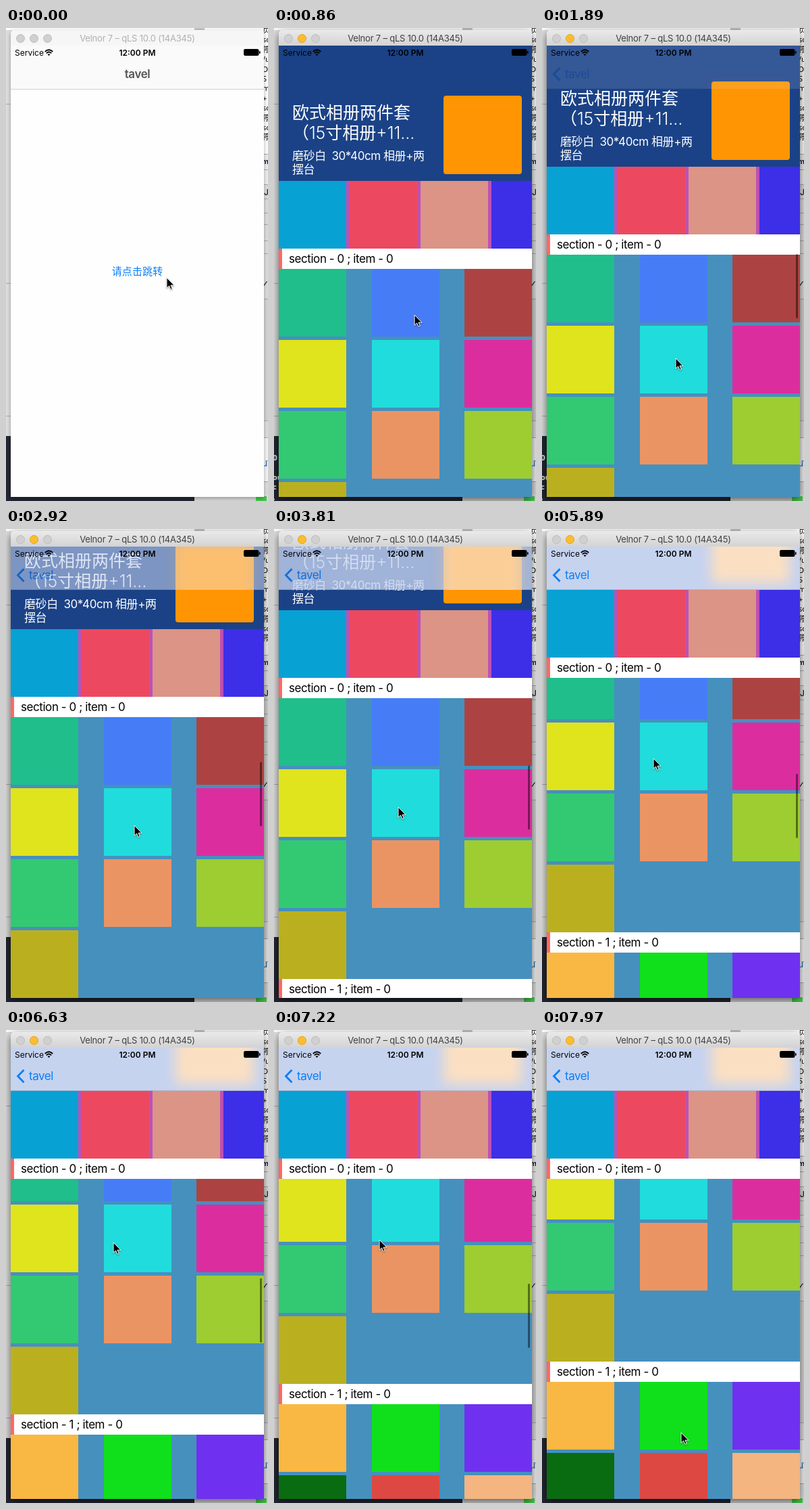
Animation of 388 by 699 pixels, one loop 8 s. Source, as an HTML page:

```html
<!DOCTYPE html>
<html lang="zh">
<head>
<meta charset="utf-8">
<title>Sticky sections</title>
<style>
html, body { margin: 0; width: 100%; height: 100%; overflow: hidden; }
body { position: relative; background: #dedede; font: 17px/20px Inter, "Noto Sans CJK SC", "Noto Sans CJK", sans-serif; letter-spacing: -.43px; }
div, svg { position: absolute; left: 0; top: 0; white-space: pre; }
#stage { width: 388px; height: 699px; overflow: hidden; }
#code { left: 380px; top: -4px; font: 11px/14.4px "Noto Sans", "Noto Sans CJK SC", "Noto Sans CJK", sans-serif; letter-spacing: 0; }
#log { left: -2px; top: 629px; color: #eee; font: bold 10px/14.4px "DejaVu Sans", sans-serif; letter-spacing: 0; }
#window { left: 7px; top: 3px; width: 375px; height: 690px; border-radius: 5px 5px 0 0; box-shadow: 0 2px 6px #0005; }
#window.active { box-shadow: 0 4px 14px #0009; }
#chrome { width: 375px; height: 23px; border-radius: 5px 5px 0 0; background: #f6f6f6; color: #b0b0b0; font-size: 13px; line-height: 25px; letter-spacing: -.2px; text-align: center; }
.active #chrome { background: linear-gradient(#eaeaea, #d3d3d3); color: #404040; }
.light { width: 11px; height: 11px; top: 6px; border-radius: 50%; background: #d0d0d0; border: .5px solid #bcbcbc; }
.active .middle { background: #fdbd2e; border-color: #dfa023; }
#screen { top: 23px; width: 375px; height: 667px; overflow: hidden; background: #fff; }
.page { width: 375px; height: 667px; overflow: hidden; }
#home { background: #fefefe; }
#homeBar { width: 375px; height: 64px; background: #fafafa; border-bottom: 1px solid #d2d2d2; color: #555; font-weight: 600; text-align: center; line-height: 85px; }
#jump { top: 324px; width: 375px; text-align: center; color: #0b7ff7; font-size: 15px; letter-spacing: .1px; }
#list { background: #4690be; }
#cells { width: 375px; }
.tile { width: 100px; height: 100px; }
.section { width: 375px; height: 30px; background: #fff; line-height: 31px; text-indent: 15px; color: #000; }
.section::before { content: ""; position: absolute; left: 0; width: 5px; height: 30px; background: #ff6866; }
#header { width: 375px; height: 200px; background: #1b4286; color: #fff; }
#name { left: 20px; top: 84px; font-size: 25px; line-height: 30px; font-weight: 300; letter-spacing: 0; }
#detail { left: 20px; top: 153px; }
#photo { left: 244px; top: 74px; width: 116px; height: 116px; border-radius: 4px; background: #ff9502; }
#strip { width: 375px; height: 100px; background: #bd51b5; overflow: hidden; }
#bar { width: 375px; height: 64px; overflow: hidden; background: #c6d3ef; color: #0b7ff7; box-shadow: inset 0 -1px #0002; }
#glow { left: 244px; width: 116px; height: 116px; background: #fbdfc2; filter: blur(9px); }
#scroller { left: 369px; width: 3px; height: 95px; border-radius: 2px; background: #0007; }
#status { width: 375px; height: 20px; font-size: 12px; line-height: 21px; letter-spacing: 0; color: #000; }
</style>
</head>
<body>
<div id="stage"></div>
<script>
const $ = id => document.getElementById(id);
const box = (x, y, w, h, color) =>
  `<div style="left:${x}px;top:${y}px;width:${w}px;height:${h}px;background:${color}"></div>`;
const tile = (x, y, color) => `<div class="tile" style="left:${x}px;top:${y}px;background:${color}"></div>`;
const section = (n, y) => `<div class="section" style="top:${y}px">section - ${n} ; item - 0</div>`;
const grid = (colors, top) =>
  colors.map((c, i) => tile(i % 3 * 137.5, top + Math.floor(i / 3) * 105, c)).join('');

const firstColors = ['#20be8b', '#467df7', '#ac4342', '#e0e41c', '#21dcdc', '#dc2d9f', '#33c973', '#eb9463', '#9dcd31', '#bab01f'];
const secondColors = ['#f9b843', '#10e01c', '#6f31ef', '#0a6c10', '#dd4843', '#f4b580'];
const stripColors = ['#08a1d4', '#ec4960', '#db9485', '#3d2ee8'];

const desktop =
  box(0, 0, 279, 3, '#fff') + box(294, 0, 94, 186, '#fff') + box(279, 0, 15, 3, '#c4c4c4') +
  [112, 377, 573].map(y => box(0, y, 7, 1, '#aaa')).join('') +
  box(0, 603, 279, 96, '#232633') + box(279, 693, 109, 6, '#d8d8d8') +
  box(380, 187, 8, 45, '#eee') + box(380, 400, 8, 180, '#d4d4d4') + box(380, 605, 8, 65, '#f4f4f4') +
  [186, 209, 231, 252, 273, 290, 314, 333, 400, 580, 605, 670].map(y => box(380, y, 8, 1, '#aaa')).join('') +
  box(370, 692, 16, 7, '#45c94b') +
  `<div id="code">页\nso\n停\n/u\nD\nS\nm\n+\nso\n停\nso\n停</div>
  <div style="left:379px;top:187px;font-size:11px;font-weight:700;color:#224">m</div>
  <div style="left:382px;top:233px;font-size:12px">J</div>
  <div style="left:379px;top:368px;font:12px/20px 'DejaVu Sans',sans-serif">✓</div>
  <div style="left:378px;top:632px;font-size:16px;color:#2a6fb5">ut</div>
  <div id="log">0\n\nou\nc\n,</div>`;

const statusBar = `<div id="status"><div style="left:6px">Service</div>
  <svg style="left:50px;top:5px" width="13" height="11" fill="none" stroke="#000" stroke-width="1.8">
    <path d="M.8 4Q6.5-1.5 12.2 4M2.8 6.3Q6.5 2.8 10.2 6.3"/><path d="M6.5 10 4.5 8Q6.5 6.4 8.5 8Z" fill="#000" stroke="none"/></svg>
  <div style="width:375px;text-align:center;font-weight:600">12:00 PM</div>
  <svg style="left:345px;top:5px" width="26" height="11">
    <rect x=".5" y=".5" width="21.5" height="9" rx="1.5" stroke="#000"/><rect x="23" y="3" width="1.6" height="4" rx=".8"/></svg></div>`;

$('stage').innerHTML = desktop + `
<div id="window">
  <div id="chrome">Velnor 7 – qLS 10.0 (14A345)<div class="light" style="left:8px"></div><div class="light middle" style="left:28px"></div><div class="light" style="left:48px"></div></div>
  <div id="screen">
    <div id="home" class="page"><div id="homeBar">tavel</div><div id="jump">请点击跳转</div></div>
    <div id="list" class="page">
      <div id="cells">${grid(firstColors, 130)}${section(1, 545)}${grid(secondColors, 575)}</div>
      <div id="header">
        <div id="name">欧式相册两件套\n（15寸相册+11…</div>
        <div id="detail">磨砂白  30*40cm 相册+两\n摆台</div>
        <div id="photo"></div>
      </div>
      <div id="pinned">
        <div id="strip">${stripColors.map((c, i) => tile(i * 105, 0, c)).join('')}</div>
        ${section(0, 100)}
      </div>
      <div id="bar">
        <div id="glow"></div>
        <svg style="left:8px;top:31px" width="14" height="23"><path d="M11.5 2 2.5 11.2 11.5 20.5" fill="none" stroke="#0b7ff7" stroke-width="2.8"/></svg>
        <div style="left:27px;top:32px">tavel</div>
      </div>
      <div id="scroller"></div>
    </div>
    ${statusBar}
  </div>
</div>
<svg id="cursor" width="16" height="22" style="filter:drop-shadow(0 1px 1px #0006)">
  <path transform="translate(1 1)" d="M0 0V15.3L3.6 12 6 17.4 8.3 16.4 6 11.2H11Z" stroke="#fff"/></svg>`;

// Tick, top edge of the scrolling list on the stage
const listTrack = [[11, 226], [12, 217], [13, 205], [20, 148], [26, 120], [32, 84], [34, 79], [40, 51], [45, 23],
  [48, -6], [49, -22], [50, -36], [51, -45], [52, -51], [54, -55]];
// Tick, pointer x, pointer y
const cursorTrack = [[0, 238, 369], [2, 214, 364], [4, 212, 366], [9, 201, 510], [11, 199, 514], [13, 198, 488],
  [20, 190, 438], [26, 184, 411], [34, 172, 370], [45, 159, 314], [48, 152, 284], [49, 156, 310], [53, 206, 585], [54, 206, 595]];

const clamp = v => Math.max(0, Math.min(1, v));
function sample(track, tick) {
  const next = track.findIndex(key => key[0] > tick);
  if (next < 0) return track[track.length - 1].slice(1);
  if (next === 0) return track[0].slice(1);
  const a = track[next - 1], b = track[next];
  const p = (tick - a[0]) / (b[0] - a[0]);
  return a.slice(1).map((v, i) => v + (b[i + 1] - v) * p);
}
const move = (id, x, y) => $(id).style.transform = `translate(${x}px,${y}px)`;

function draw() {
  const tick = Math.floor((performance.now() % 8000 + 30) / 147.5);
  const listTop = sample(listTrack, tick)[0] - 26;
  const pinnedTop = Math.max(64, listTop);
  const push = 1 - (1 - clamp((tick - 2) / 4)) ** 3;
  const [x, y] = sample(cursorTrack, tick);

  $('window').classList.toggle('active', tick >= 2);
  $('log').hidden = tick < 4 || tick > 15;
  move('home', -112 * push, 0);
  move('list', 375 * (1 - push), 0);
  move('cells', 0, Math.round(listTop));
  move('header', 0, Math.round(pinnedTop) - 200);
  move('pinned', 0, Math.round(pinnedTop));
  move('glow', 0, pinnedTop - 126);
  $('bar').style.opacity = clamp((200 - listTop) / 136);
  move('scroller', 0, 308 + (179 - listTop) * .18);
  $('scroller').style.opacity = tick < 12 ? 0 : clamp((54 - tick) / 2);
  move('cursor', Math.round(x) - 1, Math.round(y) - 1);
  requestAnimationFrame(draw);
}
draw();
</script>
</body>
</html>
```
